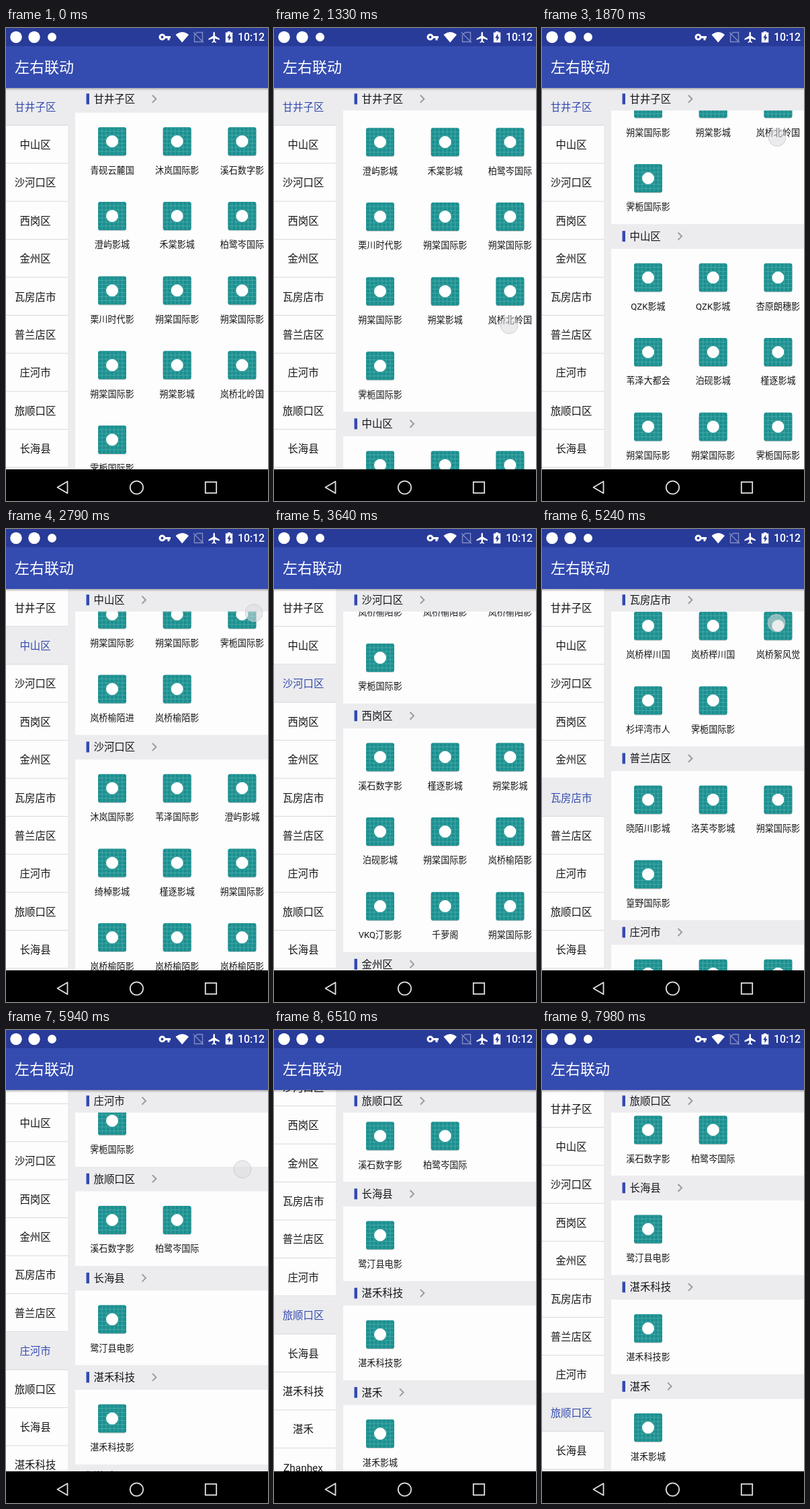
Recreate the animation shown at these times as an HTML page. Size 390x702 px, loop 8000 ms.

```html
<!DOCTYPE html>
<html lang="zh-CN">
<head>
<meta charset="utf-8">
<title>左右联动</title>
<style>
  html, body { margin: 0; width: 100%; height: 100%; overflow: hidden; background: #000; }
  svg { display: block; width: 390px; height: 702px; }
  text { font-family: Roboto, 'Noto Sans CJK SC', 'Noto Sans CJK', sans-serif; fill: #151517; }
  .mid { text-anchor: middle; }
  .item { font-size: 13.1px; }
  .area { font-size: 15.4px; }
</style>
</head>
<body>
<svg id="stage" viewBox="0 0 390 702" xmlns="http://www.w3.org/2000/svg">
  <defs>
    <clipPath id="body"><rect y="89" width="390" height="566"/></clipPath>
    <linearGradient id="shade" x2="0" y2="1">
      <stop offset="0" stop-opacity=".28"/><stop offset="1" stop-opacity="0"/>
    </linearGradient>
    <g id="tile">
      <rect x="-21" y="-20" width="42" height="42" rx="3" fill="#000" opacity=".22"/>
      <rect x="-21" y="-21" width="42" height="42" rx="3" fill="#1c9090"/>
      <path id="mesh" fill="none" stroke="#67bcba" stroke-width=".7" opacity=".75"/>
      <circle r="9" fill="#fff"/>
    </g>
  </defs>
  <rect width="390" height="702" fill="#ececee"/>
  <g clip-path="url(#body)">
    <rect y="89" width="92" height="566" fill="#fdfdfe"/>
    <g id="menu"></g>
    <rect x="103" y="89" width="287" height="566" fill="#fdfdfe"/>
    <g id="list"></g>
    <g id="sticky"></g>
    <rect y="89" width="390" height="4" fill="url(#shade)"/>
    <circle id="touch" r="13" fill="#dcdcdf" fill-opacity=".55" stroke="#c4c4c8" stroke-opacity=".7"/>
  </g>
  <rect width="390" height="27" fill="#283b99"/>
  <rect y="27" width="390" height="62" fill="#344bb0"/>
  <text x="13" y="66" font-size="22" style="fill:#fff">左右联动</text>
  <g fill="#fff">
    <circle cx="15" cy="13.5" r="8.7"/>
    <circle cx="42" cy="13.5" r="8.7"/>
    <circle cx="68.5" cy="13.5" r="6.5"/>
    <circle cx="232.5" cy="13.5" r="3.5" fill="none" stroke="#fff" stroke-width="3"/>
    <path d="M236 12h9v3.2h-1.5v3h-3v-3H236z"/>
    <path d="M252.5 10q9.700-8 19.500 0L262.200 21.500z"/>
    <path d="M284.500 6.500h8V20.500h-12V10.500zM279 6.500L294 21.500" fill="none" stroke="#7f8bc2" stroke-width="1.400"/>
    <path d="M308.500 7q1.200-3 2.400 0v4.500l7 4.200v2l-7-2.200v3.800l2 1.500v1.200l-3.200-.9-3.200.9v-1.200l2-1.500v-3.800l-7 2.200v-2l7-4.200z"/>
    <path d="M330 5h4v1.500h3.200V21.500h-10.400V6.500H330z"/>
    <path d="M333.200 8.500l-4 6.200h2.300v4.800l4-6.300h-2.300z" fill="#283b99"/>
  </g>
  <text x="345" y="19" font-size="15.8" font-weight="500" style="fill:#fff">10:12</text>
  <rect y="655" width="390" height="47" fill="#000"/>
  <g fill="none" stroke="#e2e2e2" stroke-width="1.8">
    <path d="M91.500 673V690.500L76.500 681.800z" stroke-linejoin="round"/>
    <circle cx="194.500" cy="682" r="9.700"/>
    <rect x="296.800" y="673.800" width="16.400" height="16.400"/>
  </g>
</svg>
<script>
const TOP = 89, HEAD = 36.6, ROW = 110.7, COL = 96.7, CELL = 56.4, BAR = 33.5;
const $ = id => document.getElementById(id);

const areas = `甘井子区:青砚云麓国 沐岚国际影 溪石数字影 澄屿影城 禾棠影城 柏鹭岑国际 栗川时代影 朔棠国际影 朔棠国际影 朔棠国际影 朔棠影城 岚桥北岭国 霁栀国际影
中山区:QZK影城 QZK影城 杏原朗穗影 苇泽大都会 泊砚影城 槿逐影城 朔棠国际影 朔棠国际影 霁栀国际影 岚桥榆陌进 岚桥榆陌影
沙河口区:沐岚国际影 苇泽国际影 澄屿影城 绮棹影城 槿逐影城 朔棠国际影 岚桥榆陌影 岚桥榆陌影 岚桥榆陌影 霁栀国际影
西岗区:溪石数字影 槿逐影城 朔棠影城 泊砚影城 朔棠国际影 岚桥榆陌影 VKQ汀影影 千萝阁 朔棠国际影
金州区:杏原朗穗影 溪石数字影 槿逐影城 百橹影城 蘅汀影城 朔棠国际影 朔棠国际影 岚桥榆陌影 岚桥榆陌影 岚桥霁栀银
瓦房店市:岚桥榉川国 岚桥榉川国 岚桥絮风觉 杉坪湾市人 霁栀国际影
普兰店区:晓陌川影城 洛芙岑影城 朔棠国际影 篁野国际影
庄河市:溪石数字影 岚桥榆陌影 朔棠国际影 霁栀国际影
旅顺口区:溪石数字影 柏鹭岑国际
长海县:鹭汀县电影
湛禾科技:湛禾科技影
湛禾:湛禾影城
Zhanhex:`.split('\n').map(line => {
  const [name, items] = line.split(':');
  return { name, items: items ? items.split(' ') : [] };
});

const header = (name, y, h, cy) => `<rect x="103" y="${y}" width="287" height="${h}" fill="#ececee"/>
  <rect x="119.500" y="${cy - 8}" width="4.500" height="16" fill="#344bb0"/>
  <text class="area" x="130.500" y="${cy + 5.8}">${name}</text>
  <path d="M${154.8 + name.length * 15.4 + 1.5} ${cy - 5.5}l5.500 5.500l-5.500 5.500" fill="none" stroke="#9c9c9f" stroke-width="2"/>`;

function build() {
  let mesh = '';
  for (let p = -15; p <= 15; p += 6) mesh += `M${p} -21v42M-21 ${p}h42`;
  $('mesh').setAttribute('d', mesh);

  let y = 0, list = '';
  for (const area of areas) {
    area.y = y;
    if (!area.items.length) continue;
    list += header(area.name, y, HEAD, y + 18);
    y += HEAD;
    area.items.forEach((name, i) => {
      const x = 158 + i % 3 * COL, top = y + Math.floor(i / 3) * ROW;
      list += `<use href="#tile" x="${x}" y="${top + 42.6}"/>
        <text class="item mid" x="${x}" y="${top + 90}">${name}</text>`;
    });
    y += Math.ceil(area.items.length / 3) * ROW;
  }
  $('list').innerHTML = list;

  $('menu').innerHTML = areas.map(({ name }, i) => `<g transform="translate(0 ${i * CELL})">
    <rect width="92" height="${CELL}" fill="none"/>
    <rect y="${CELL - 1}" width="92" height="1" fill="#d9d9dc"/>
    <text class="area mid" x="43.500" y="34">${name}</text></g>`).join('');
}

// Monotone cubic through [time, value] points.
function curve(keys, t) {
  const last = keys.length - 1;
  if (t <= keys[0][0]) return keys[0][1];
  if (t >= keys[last][0]) return keys[last][1];
  const slope = i => (keys[i + 1][1] - keys[i][1]) / (keys[i + 1][0] - keys[i][0]);
  const tangent = i => {
    if (i === 0 || i === last) return slope(i ? i - 1 : 0);
    const a = slope(i - 1), b = slope(i);
    return a * b > 0 ? 2 * a * b / (a + b) : 0;
  };
  const i = keys.findIndex(k => k[0] > t) - 1;
  const [t0, a] = keys[i], [t1, b] = keys[i + 1], d = t1 - t0, u = (t - t0) / d;
  return a + (b - a) * u * u * (3 - 2 * u)
    + d * u * (1 - u) * (tangent(i) * (1 - u) - tangent(i + 1) * u);
}

const listKeys = [[1100, 0], [1871, 388], [2790, 853], [4328, 1828.6], [5244, 2421.5],
  [6050, 3120], [6260, 3174], [6496, 3182], [6800, 3191]];
const menuKeys = [[5800, 0], [6180, 95], [6496, 144.5], [6800, 167], [7120, 167], [7500, 60], [7980, 0]];

// Swipes: start, end, x and y at the end.
const swipes = [[1160, 1880, 350, 158], [2340, 2800, 369, 119], [3140, 3570, 355, 140],
  [3870, 4340, 338, 162], [4780, 5250, 349, 135], [5640, 6060, 352, 140]];

// The screen refreshes in bursts of even steps: start, end, step count.
const bursts = [[1160, 1950, 10], [2030, 2790, 10], [2870, 3640, 10], [3720, 4480, 10],
  [4560, 5320, 10], [5420, 6190, 9], [6260, 6810, 7], [7190, 7980, 10]];

function refreshTime(t) {
  let held = 0;
  for (const [a, b, n] of bursts) {
    if (t >= a) held = a + Math.min(n, Math.floor((t - a) / (b - a) * n + .1)) * (b - a) / n;
  }
  return held;
}

let selected = -1;

function select(index) {
  if (index === selected) return;
  selected = index;
  $('sticky').innerHTML = header(areas[index].name, TOP, BAR, 105.3);
  [...$('menu').children].forEach((cell, i) => {
    cell.children[0].setAttribute('fill', i === index ? '#ececee' : 'none');
    cell.children[2].style.fill = i === index ? '#344bb0' : '';
  });
}

function draw(time) {
  const t = refreshTime(time), scroll = curve(listKeys, t);
  const shift = (id, y) => $(id).setAttribute('transform', `translate(0 ${y.toFixed(2)})`);
  const index = areas.filter(a => a.items.length && a.y <= scroll).length - 1;
  select(index);
  shift('list', TOP - scroll);
  shift('menu', TOP - .5 - curve(menuKeys, t));
  shift('sticky', Math.min(0, areas[index + 1].y - scroll - BAR));

  const swipe = swipes.find(([a, b]) => t >= a && t <= b);
  $('touch').style.display = swipe ? '' : 'none';
  if (swipe) {
    const [, end, x, y] = swipe;
    $('touch').setAttribute('cx', x);
    $('touch').setAttribute('cy', y + curve(listKeys, end) - scroll);
  }
}

build();
const start = performance.now();
function tick() {
  draw((performance.now() - start) % 8000);
  requestAnimationFrame(tick);
}
tick();
</script>
</body>
</html>
```
